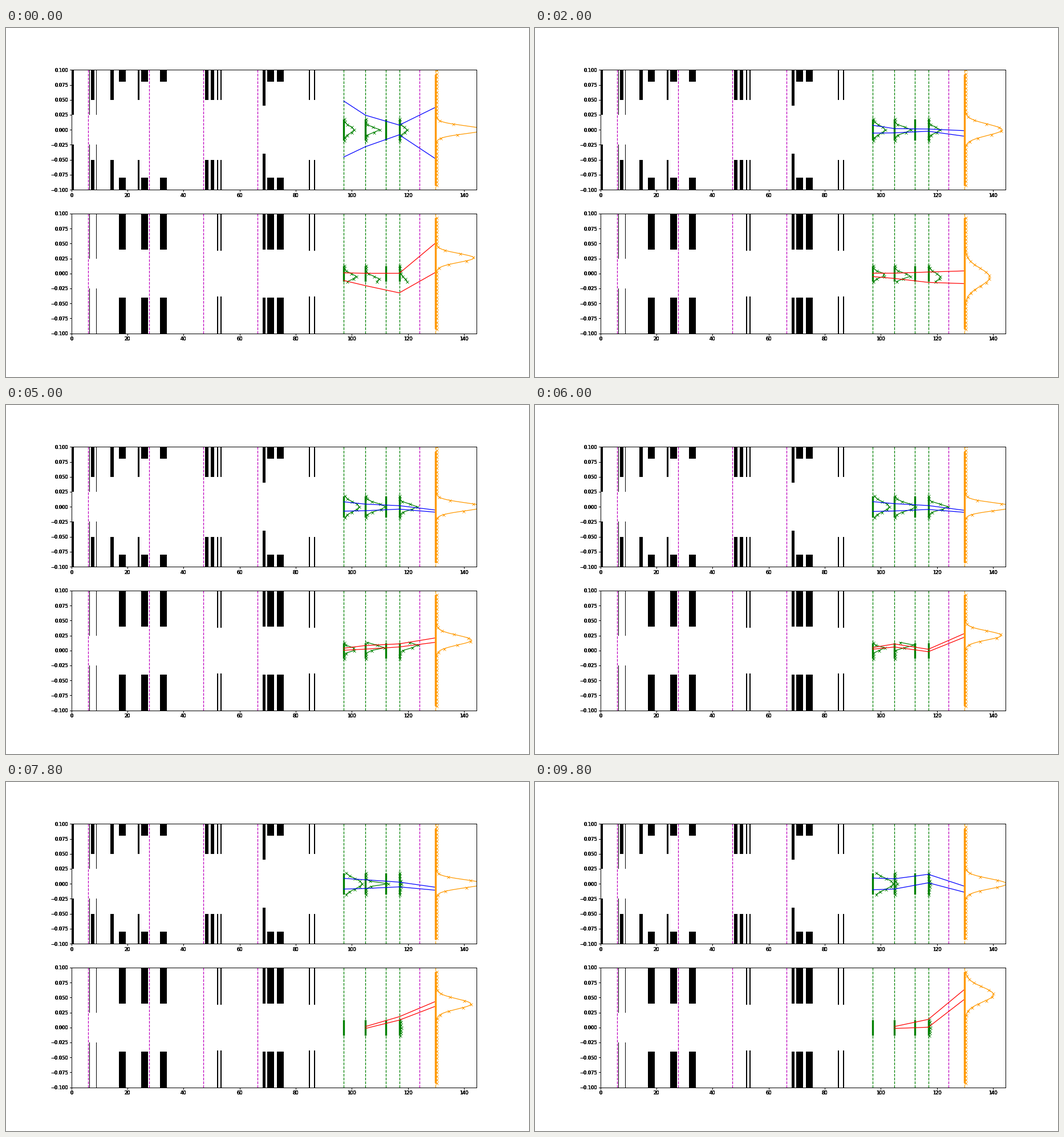
Animation of 917x611 px, one loop 10000 ms. Source, as a matplotlib script:

```python
import numpy as np
import matplotlib.pyplot as plt
from matplotlib.animation import FuncAnimation
from matplotlib.patches import Rectangle

DPI = 60
FRAMES, STEP_MS = 50, 200
INK_LAYERS = 5          # stacked axes that darken labels, ticks and borders

MAGNETS = [6.05, 27.75, 47.1, 66.4, 124.1]
GRIDS = [97.1, 104.85, 112.1, 116.9]
TARGET = 129.7
STATIONS = [97.1, 104.85, 116.9, TARGET]

# width, half aperture in x, half aperture in y, left edges
COLLIMATORS = [
    (0.9, .025, None, [0]),
    (0.2, .025, .025, [6.35, 8.75]),
    (1.2, .05, None, [7.0, 13.9, 47.6, 49.7]),
    (0.7, .05, None, [23.6]),
    (2.45, .08, .04, [17.0, 24.9, 31.6, 69.8, 73.3]),
    (0.4, .05, .038, [52.0, 53.1, 84.6, 86.5]),
    (1.1, .04, .04, [68.1]),
]


def gauss(y, amp, mid, sigma):
    return amp * np.exp(-(y - mid) ** 2 / (2 * sigma ** 2))


class Plane:
    """One transverse plane: static beamline plus moving profiles (in mm)."""

    def __init__(self, ax, axis, bar, color, grid_half, target_wires):
        self.grid_wires = 4.5 * np.arange(-grid_half, grid_half + 1)
        self.target_wires = target_wires
        ax.set(xlim=(0, 144.5), ylim=(-0.1, 0.1))
        for width, *gaps, lefts in COLLIMATORS:
            gap = gaps[axis]
            if gap is None:
                continue
            for left in lefts:
                for low in (gap, -0.1):
                    ax.add_patch(Rectangle((left, low), width, 0.1 - gap,
                                           color="k", lw=0))
        for xs, c in ((MAGNETS, "m"), (GRIDS, "g"), ([TARGET], "#ff9900")):
            for x in xs:
                ax.axvline(x, color=c, ls="--", lw=1.5)
        for x in GRIDS:
            ax.plot([x, x], [-bar, bar], color="g", lw=4)
        self.grids = [ax.plot([], [], "x-", color="g")[0] for _ in range(3)]
        self.edges = [ax.plot([], [], color=color)[0] for _ in range(2)]
        ax.plot([TARGET] * 2, [-0.091, 0.091], color="#ff9900", lw=4)
        self.fit, = ax.plot([], [], color="#ff9900")
        self.data, = ax.plot([], [], "x", color="#ff9900")

        for _ in range(INK_LAYERS):
            layer = ax.figure.add_axes(ax.get_position(), facecolor="none")
            layer.set(xlim=ax.get_xlim(), ylim=ax.get_ylim())

    def draw_envelope(self, top, low, first=0):
        for line, y in zip(self.edges, (top, low)):
            line.set_data(STATIONS[first:], np.array(y[first:]) / 1000)

    def draw_grids(self, profiles):
        for line, x, profile in zip(self.grids, STATIONS, profiles):
            line.set_visible(profile is not None)
            if profile is not None:
                y = self.grid_wires
                line.set_data(x + .1 + gauss(y, *profile), y / 1000)

    def draw_target(self, amp, mid, sigma, shift=0):
        smooth = np.linspace(-93, 93, 400)
        for line, y in ((self.fit, smooth),
                        (self.data, self.target_wires + shift)):
            line.set_data(TARGET + .45 + gauss(y, amp, mid, sigma), y / 1000)


def draw_x(u, kick, late):
    end = u ** 16
    wide = kick * np.array([41, 24, 7, 34])
    top = [7 + 2.5 * u, .3 + 8 * u, .8 + 2 * u + 13 * end,
           -6 + 20 * (u - .68) ** 2]
    low = [-4.5 - 5.5 * u, -4.2 - 4.6 * u, -1.4 - 5 * u + 8 * end,
           -9 - 20 * (u - .5) ** 2]
    plane_x.draw_envelope(top + wide, low - wide)
    plane_x.draw_grids([
        (3.6 + 3.6 * u, 0, 5.8 + 3.6 * u),
        ((5 + 4 * u) * (1 - .9 * end), -.2, 2.5 if late else 4 + 3.5 * u),
        (.6 if late else 2.7 + 7 * u, -.4, 4.7),
    ])
    focus = (u - .65) ** 2
    plane_x.draw_target(17.2 - 21 * focus + 8.8 * kick, 0,
                        6.5 + 15 * focus - 6.3 * kick, .5 + 2.5 * u)


def draw_y(u, kick, gone, late):
    focus = (u - .64) ** 2
    mid = np.array([-5.3 + 14.5 * u, -10 + 30 * u, -16 + 48 * u,
                    -22 + 77 * u + 48 * kick])
    half = np.array([3.5 - 3.5 * u + 2.9 * kick, 5.3 - 4.5 * u + 5 * kick,
                     2 + 35 * focus, 3 + 40 * focus + 5 * kick])
    if late:
        mid[1], half[1] = 0, 1.6
        mid[2] = 15 - 40 * (u - .8)
    elif gone:
        mid[2] = 0
    plane_y.draw_envelope(mid + half, mid - half, first=int(late))

    last = (.5, 0, 10) if late else (2.7 + 7.5 * u, mid[2], 8.6 - 8 * u)
    plane_y.draw_grids([
        None if late else (4.4, mid[0], 5 - 3.3 * u),
        None if late else (4.9 + 3.6 * u, mid[1], 5.2 - 3.3 * u),
        None if gone and not late else last,
    ])
    plane_y.draw_target(12.8 - 22 * focus + 9.5 * kick, mid[3],
                        7.5 + 40 * focus - 16.5 * kick)


def update(i):
    u = i / (FRAMES - 1)
    kick = max(0, 1 - i / 10)       # unsettled start that fades out
    gone, late = i >= 28, i >= 34   # beam leaves the y grids
    draw_x(u, kick, late)
    draw_y(u, kick, gone, late)
    return []


fig, (ax_x, ax_y) = plt.subplots(
    2, 1, figsize=(917 / DPI + 1e-6, 611 / DPI + 1e-6), dpi=DPI)
fig.subplots_adjust(left=.125, right=.9, bottom=.125, top=.88, hspace=.2)
plane_x = Plane(ax_x, 0, .016, "b", 4, 6 * np.arange(-15.5, 17))
plane_y = Plane(ax_y, 1, .0115, "r", 3, 6 * np.arange(-15.5, 16))

anim = FuncAnimation(fig, update, frames=FRAMES, interval=STEP_MS,
                     init_func=lambda: update(0), repeat=True, repeat_delay=0)
plt.show()
```
